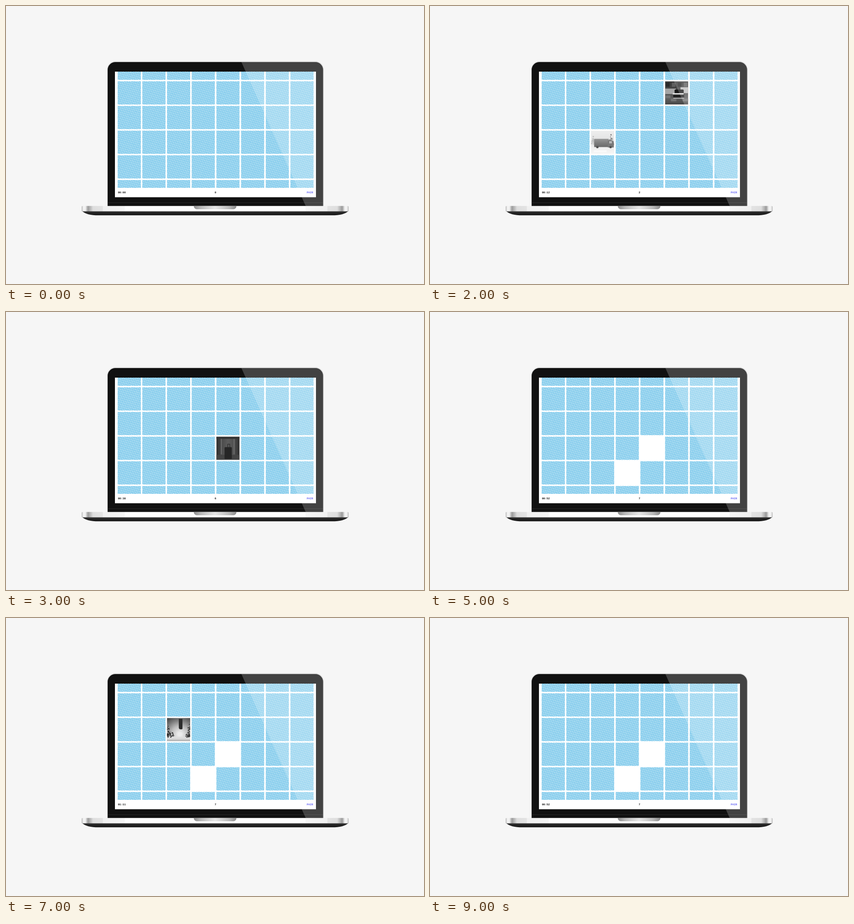
These frames come from a looping animation (917 by 610 pixels, 10000 ms). An HTML page with a canvas:

```html
<!DOCTYPE html>
<html lang="en">
<head>
<meta charset="utf-8">
<title>Memory game</title>
<style>
  html, body { margin: 0; width: 100%; height: 100%; overflow: hidden; background: #f6f6f6; }
  canvas { display: block; }
</style>
</head>
<body>
<canvas id="stage" width="917" height="610"></canvas>
<script>
const ctx = document.getElementById('stage').getContext('2d');
const LOOP = 10000, SIZE = 51, PITCH = 54.13;
const LEFT = 166, WIDTH = 585.5;

// A card is [column, row, photo]; without a photo its place is empty
const foundPair = [[4, 3], [3, 4]];
const paused = { clock: '00:52', count: 7, cards: foundPair };
const steps = [
  { at: 0, clock: '00:00', count: 0, cards: [] },
  { at: 1000, clock: '00:07', count: 0, cards: [[2, 3, van]] },
  { at: 2000, clock: '00:12', count: 2, cards: [[2, 3, van], [5, 1, chair]] },
  { at: 3000, clock: '00:38', count: 6, cards: [[4, 3, suitcase]] },
  { at: 4000, clock: '00:44', count: 7, cards: [[4, 3, suitcase], [3, 4, suitcase]] },
  { at: 5000, ...paused },
  { at: 7000, clock: '01:11', count: 7, cards: [...foundPair, [2, 2, street]] },
  { at: 8000, clock: '01:16', count: 8, cards: [...foundPair, [2, 2, street], [3, 1, street]] },
  { at: 9000, ...paused }
];

const gray = v => `rgb(${v},${v},${v})`;

function box(x, y, w, h, fill) {
  ctx.fillStyle = fill;
  ctx.fillRect(x, y, w, h);
}

function round(x, y, w, h, radii, fill) {
  ctx.beginPath();
  ctx.roundRect(x, y, w, h, radii);
  ctx.fillStyle = fill;
  ctx.fill();
}

function dot(x, y, r, fill) {
  ctx.beginPath();
  ctx.arc(x, y, r, 0, Math.PI * 2);
  ctx.fillStyle = fill;
  ctx.fill();
}

// Evenly spaced gray levels
function shade(x0, y0, x1, y1, ...levels) {
  const g = ctx.createLinearGradient(x0, y0, x1, y1);
  levels.forEach((v, i) => g.addColorStop(i / (levels.length - 1), gray(v)));
  return g;
}

function seeded(seed) {
  return () => (seed = (seed * 16807) % 2147483647) / 2147483647;
}

// Leaves scattered in a cone that narrows towards the top
function tree(x, top, bottom, spread, level, seed) {
  const rnd = seeded(seed);
  for (let i = 0; i < 45; i++) {
    const t = Math.sqrt(rnd());
    const dx = (rnd() - 0.5) * 2 * spread * t;
    dot(x + dx, top + (bottom - top) * t, 0.6 + rnd() * 1.2, gray(level + Math.round(rnd() * 35)));
  }
}

function cardBack() {
  box(0, 0, SIZE, SIZE, '#c0e4f4');
  ctx.beginPath();
  for (let n = 0; n < 26; n++) {
    for (let x = 0; x <= SIZE; x++) {
      const y = n * 3.3 - x * 0.6 + 0.5 * Math.sin(x * 1.2 + n * 1.9);
      if (x) ctx.lineTo(x, y); else ctx.moveTo(x, y);
    }
  }
  ctx.strokeStyle = '#70c4ea';
  ctx.lineWidth = 1.4;
  ctx.stroke();
}

function van() {
  box(0, 0, SIZE, SIZE, shade(0, 0, 0, SIZE, 238, 232, 222, 238, 246));
  tree(5, 13, 30, 5, 180, 5);
  tree(44, 9, 32, 7, 125, 9);
  round(7, 18, 32, 18, 1, shade(0, 18, 0, 36, 150, 125, 105));
  round(37, 21, 13, 16, [1, 6, 1, 1], gray(120));
  box(40, 23, 6, 5, gray(185));
  for (const x of [14, 43]) dot(x, 36, 2.6, gray(80));
  box(6, 43, 28, 4, gray(250));
}

function chair() {
  box(0, 0, SIZE, SIZE, shade(0, 0, 0, SIZE, 55, 65, 80, 95, 70));
  for (let i = 0; i < 4; i++) box(2 + i * 13, 3, 8, 9, gray(i % 2 ? 95 : 40));
  box(0, 16, 24, 12, gray(165));
  box(34, 13, 17, 13, gray(190));
  for (let i = 0; i < 4; i++) box(i * 13, 31 + i % 2 * 7, 12, 6, gray(115));
  round(21, 18, 20, 14, 2, gray(24));
  box(18, 27, 24, 11, gray(34));
  box(17, 26, 24, 3, gray(228));
  box(18, 36, 24, 2, gray(190));
}

function suitcase() {
  box(0, 0, SIZE, SIZE, shade(0, 0, SIZE, 0, 46, 76, 92, 80, 46));
  box(0, 0, SIZE, 5, gray(52));
  for (const x of [10, 38]) box(x, 5, 2, 34, gray(112));
  box(0, 40, SIZE, 11, gray(68));
  ctx.strokeStyle = gray(34);
  ctx.strokeRect(25, 16.5, 4.5, 8);
  round(18, 23, 16, 26, 1.5, gray(38));
}

function street() {
  const glow = ctx.createRadialGradient(28, 36, 4, 28, 36, 46);
  [235, 190, 120, 55].forEach((v, i) => glow.addColorStop(i / 3, gray(v)));
  box(0, 0, SIZE, SIZE, glow);
  box(0, 41, SIZE, 10, shade(0, 41, 0, SIZE, 225, 215, 165));
  round(26, 2, 8, 23, [0, 0, 2, 4], gray(44));
  tree(3, 18, 42, 16, 28, 3);
  tree(49, 14, 42, 9, 35, 7);
}

function lid() {
  round(221.6, 121, 475.6, 318, [19, 19, 0, 0], '#dedede');
  round(223, 123, 472.6, 316, [17, 17, 0, 0], '#111');
  box(224, 431, 471, 1, '#282828');
}

// Metal bar, mirrored at its middle
function base() {
  ctx.beginPath();
  ctx.moveTo(167, 450);
  ctx.bezierCurveTo(173, 456, 185, 459.3, 203, 459.3);
  ctx.lineTo(715, 459.3);
  ctx.bezierCurveTo(733, 459.3, 745, 456, 751, 450);
  ctx.fillStyle = shade(0, 450, 0, 459, 62, 40, 30, 24);
  ctx.fill();
  const metal = ctx.createLinearGradient(LEFT, 0, LEFT + WIDTH, 0);
  const stops = [[0, 175], [3, 240], [8, 244], [14, 155], [25, 222], [46, 227], [47, 240], [94, 245], [95, 253]];
  for (const [px, v] of stops) {
    metal.addColorStop(px / WIDTH, gray(v));
    metal.addColorStop(1 - px / WIDTH, gray(v));
  }
  round(LEFT, 438.7, WIDTH, 11.8, [2, 2, 1, 1], metal);
  round(412, 438.7, 93.5, 7.3, [0, 0, 7, 7], shade(412, 0, 505, 0, 140, 185, 210, 230, 210, 185, 140));
}

function gloss() {
  ctx.save();
  ctx.beginPath();
  ctx.roundRect(223, 123, 472.6, 316, [17, 17, 0, 0]);
  ctx.clip();
  ctx.beginPath();
  ctx.moveTo(516, 122);
  ctx.lineTo(697, 122);
  ctx.lineTo(697, 439);
  ctx.lineTo(657.5, 439);
  ctx.fillStyle = 'rgba(255,255,255,.205)';
  ctx.fill();
  ctx.restore();
}

function label(text, x, align, fill) {
  ctx.font = 'bold 5.75px "Liberation Mono", "DejaVu Sans Mono", monospace';
  ctx.textAlign = align;
  ctx.fillStyle = fill;
  ctx.fillText(text, x, 411.2);
}

function card(c, r, paint) {
  ctx.save();
  ctx.translate(244.9 + c * PITCH, 111.1 + r * PITCH);
  ctx.beginPath();
  ctx.rect(0, 0, SIZE, SIZE);
  ctx.clip();
  paint();
  ctx.restore();
}

function board(cards) {
  ctx.save();
  ctx.beginPath();
  ctx.rect(239, 144, 441, 255);
  ctx.clip();
  for (let r = 0; r < 6; r++) {
    for (let c = 0; c < 8; c++) {
      const open = cards.find(k => k[0] === c && k[1] === r);
      const paint = open ? open[2] : cardBack;
      if (paint) card(c, r, paint);
    }
  }
  ctx.restore();
}

function draw(step) {
  box(0, 0, 917, 610, '#f6f6f6');
  lid();
  box(239, 144, 441, 275.6, '#fff');
  board(step.cards);
  label(step.clock, 245.4, 'left', '#111');
  label(step.count, 459.5, 'center', '#111');
  label('PAIR', 673.6, 'right', '#3a3af0');
  gloss();
  base();
}

let shown = null;
function tick(now) {
  const t = now % LOOP;
  const step = steps.findLast(s => s.at <= t) || steps[0];
  if (step !== shown) draw(shown = step);
  requestAnimationFrame(tick);
}
tick(performance.now());
</script>
</body>
</html>
```
